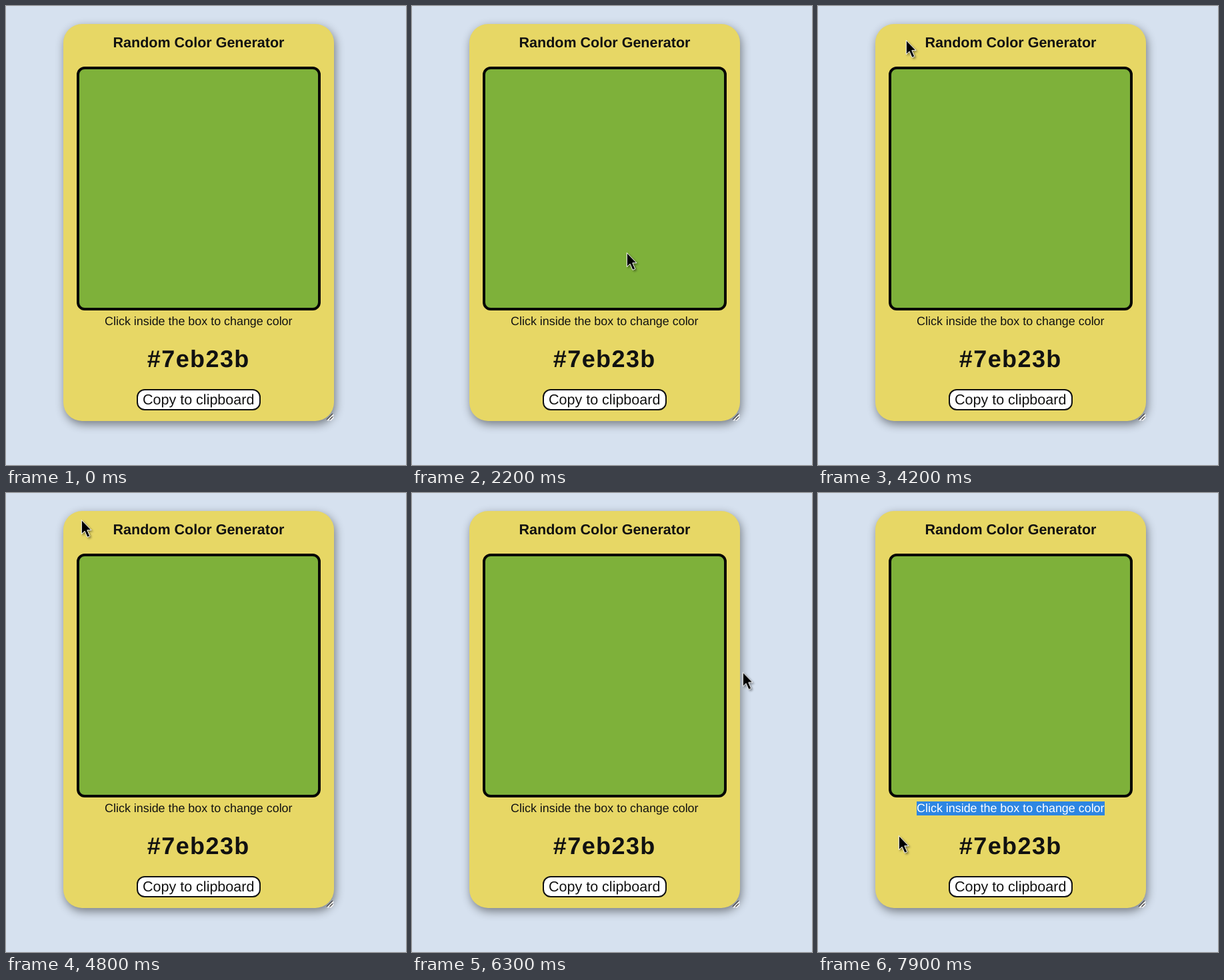
Animation, 600 px wide and 689 px high, one loop 8000 ms. Source, as an HTML page:

```html
<!DOCTYPE html>
<html lang="en">
<head>
<meta charset="utf-8">
<title>Random Color Generator</title>
<style>
  html, body { margin: 0; width: 100%; height: 100%; overflow: hidden; background: #d6e1ef; }
  div, svg { position: absolute; box-sizing: border-box; }
  svg { left: 0; top: 0; width: 600px; height: 689px; color: #111; }

  .card { left: 86px; top: 27px; width: 406px; height: 596px; border-radius: 28px;
    background: #e7d765; box-shadow: 2px 5px 14px rgba(0, 0, 0, .45); }
  .box { left: 20px; top: 64px; width: 366px; height: 366px; border-radius: 12px;
    border: 4px solid #050505; background: #7eb13a; }
  .button { left: 109.5px; top: 547.5px; width: 186px; height: 32px; border-radius: 12px;
    border: 2px solid #111; background: #fff; }

  text { font-family: "Liberation Sans", Arial, sans-serif; text-anchor: middle;
    text-rendering: geometricPrecision; fill: currentColor; }
  #title { font-size: 21.5px; font-weight: bold; }
  #hint { font-size: 17.9px; }
  .hex { font-size: 36px; font-weight: bold; letter-spacing: 1.4px; }
  .copy { font-size: 21.5px; }

  /* White text on blue, clipped to the selected part */
  .picked { color: #fff; background: #2d86e3; }
  .picked.title { animation: pick-title 8s infinite; }
  .picked.hint { animation: pick-hint 8s infinite; }
  @keyframes pick-title {
    0%, 63.75% { clip-path: inset(42px 440px 621px 160px); animation-timing-function: steps(5); }
    70% { clip-path: inset(42px 182px 621px 160px); animation-timing-function: step-end; }
    73.75%, 100% { clip-path: inset(42px 440px 621px 160px); }
  }
  @keyframes pick-hint {
    0%, 85% { clip-path: inset(463px 170px 205px 430px); animation-timing-function: steps(2); }
    87.5% { clip-path: inset(463px 170px 205px 307px); animation-timing-function: steps(6); }
    95%, 100% { clip-path: inset(463px 170px 205px 148px); }
  }

  /* The pointer moves ten times a second */
  .cursor { animation: roam 8s infinite; filter: drop-shadow(2px 2px 1.5px rgba(0, 0, 0, .4)); }
  @keyframes roam {
    0%, 15% { transform: translate(342px, 700px); animation-timing-function: steps(10); }
    27.5% { transform: translate(322px, 370px); animation-timing-function: steps(20); }
    52.5% { transform: translate(132px, 51px); animation-timing-function: steps(6); }
    60%, 62.5% { transform: translate(113px, 40px); animation-timing-function: steps(7); }
    71.25% { transform: translate(483px, 65px); animation-timing-function: steps(2); }
    73.75% { transform: translate(497px, 119px); animation-timing-function: steps(3); }
    77.5% { transform: translate(507px, 230px); animation-timing-function: steps(6); }
    85% { transform: translate(441px, 462px); animation-timing-function: steps(2); }
    87.5% { transform: translate(285px, 459px); animation-timing-function: steps(7); }
    96.25% { transform: translate(135px, 468px); animation-timing-function: steps(2); }
    98.75%, 100% { transform: translate(121px, 514px); }
  }
</style>
</head>
<body>
<div class="card">
  <div class="box"></div>
  <div class="button"></div>
</div>
<svg>
  <g fill="none">
    <path d="M482 622L491 613M486 622L491 617" stroke="#f3f3f3" stroke-width="3"/>
    <path d="M481 621L490 612M485.500 621L490 616.500" stroke="#4b4b4b" stroke-width="1.500"/>
  </g>
  <text id="title" x="289" y="61.500">Random Color Generator</text>
  <text id="hint" x="288.800" y="478.500">Click inside the box to change color</text>
  <text class="hex" x="288.800" y="542">#7eb23b</text>
  <text class="copy" x="288.700" y="597.500">Copy to clipboard</text>
</svg>
<svg class="picked title"><use href="#title"/></svg>
<svg class="picked hint"><use href="#hint"/></svg>
<svg>
  <path class="cursor" d="M.3 .5V21.500L5.100 17.200L9 26.300L12.800 24.700L8.800 15.700H15Z"
    fill="#000" stroke="#fff"/>
</svg>
</body>
</html>
```
